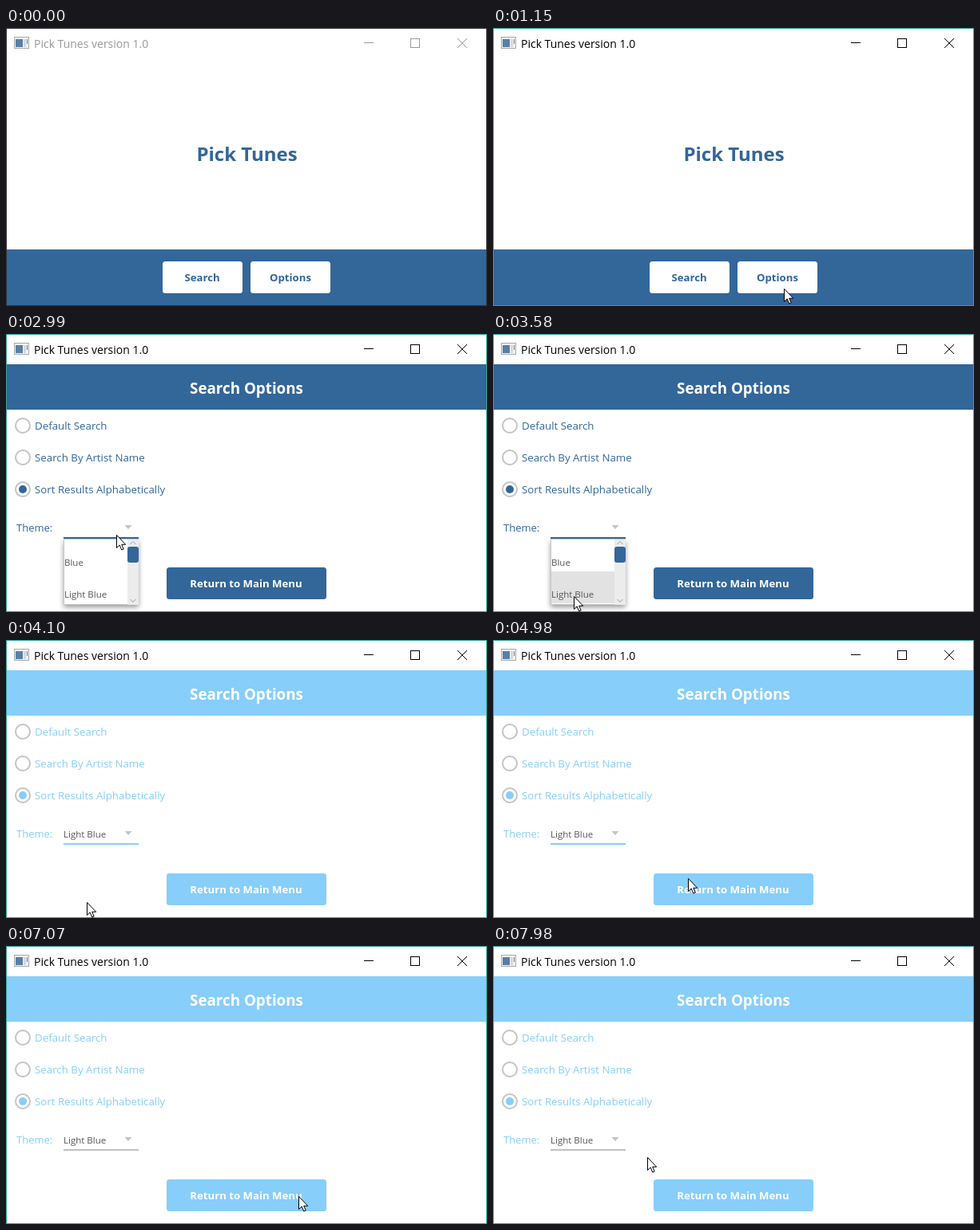
Write an HTML page that moves like this. It is 602 by 349 pixels and loops after 8 s.

```html
<!DOCTYPE html>
<html lang="en">
<head>
<meta charset="utf-8">
<title>Pick Tunes</title>
<style>
  html, body { margin: 0; width: 100%; height: 100%; overflow: hidden; background: #fff; }
  svg { display: block; width: 602px; height: 349px; font-family: "Open Sans", "Noto Sans", sans-serif;
        --accent: #336699; --chrome: #999; --frame: #333; --line: #c0c0c0; --arrow: #c4c4c4; }
  .active { --chrome: #000; --frame: #2ba898; }
  .light { --accent: #87cefa; }
  .focused { --line: var(--accent); }
  .hovered { --arrow: #909090; }
  .accent { fill: var(--accent); }
  .white { fill: #fff; }
  .bold { font-weight: 700; text-anchor: middle; }
  .button { font-size: 13.2px; }
  .label { font-size: 13.3px; }
  .item { font-size: 11.5px; fill: #555; }
  .control { fill: none; stroke: var(--chrome); }
</style>
</head>
<body>
<svg id="stage" viewBox="0 0 602 349">
  <defs>
    <filter id="shadow" x="-20%" y="-20%" width="140%" height="140%">
      <feDropShadow dx="0" dy="3" stdDeviation="3" flood-opacity=".4"/>
    </filter>
  </defs>
  <rect width="602" height="349" class="white"/>

  <!-- title bar -->
  <g shape-rendering="crispEdges">
    <rect x="10.5" y="11.5" width="18" height="14" fill="#f4f4f4" stroke="#a3a9ae"/>
    <rect x="12" y="14" width="9" height="10" fill="#5a7fa6"/>
    <rect x="22" y="14" width="3" height="10" fill="#d4d9dd"/>
    <rect x="26" y="14" width="1" height="6" fill="#707880"/>
  </g>
  <text x="35" y="24.5" font-size="14" fill="var(--chrome)">Pick Tunes version 1.0</text>
  <path class="control" d="M448 18.5h12M506.500 13.500h11v11h-11z" shape-rendering="crispEdges"/>
  <path class="control" d="M565 13l12 12M577 13l-12 12"/>

  <g id="menu">
    <text x="301.500" y="167" font-size="24" class="accent bold">Pick Tunes</text>
    <rect y="278" width="602" height="71" class="accent"/>
    <rect x="196" y="293" width="100" height="40" rx="3.500" class="white"/>
    <rect x="306" y="293" width="100" height="40" rx="3.500" class="white"/>
    <text x="245.500" y="318" class="accent bold button">Search</text>
    <text x="356" y="318" class="accent bold button">Options</text>
  </g>

  <g id="options">
    <rect y="38" width="602" height="57" class="accent"/>
    <text x="301" y="75" font-size="18.800" class="white bold">Search Options</text>
    <g id="radios"></g>
    <circle cx="21" cy="195" r="5" class="accent"/>
    <text x="13" y="248" font-size="13" class="accent">Theme:</text>
    <text id="theme" x="72" y="248" class="item">Light Blue</text>
    <path d="M148.500 240h9l-4.500 5z" fill="var(--arrow)"/>
    <rect x="72" y="255" width="94" height="2" fill="var(--line)"/>
    <rect x="201" y="293" width="200" height="40" rx="3.500" class="accent"/>
    <text x="300.500" y="318" class="white bold button">Return to Main Menu</text>
  </g>

  <g id="popup">
    <rect x="72" y="258" width="94" height="82" class="white" filter="url(#shadow)"/>
    <rect x="72.500" y="257.500" width="93" height="82" fill="#fff" stroke="#c8c8c8"/>
    <rect id="hover" x="73" width="79" height="40" fill="#e2e2e2"/>
    <text x="73" y="291" class="item">Blue</text>
    <text x="73" y="331" class="item">Light Blue</text>
    <rect x="152" y="258" width="14" height="82" fill="#ececec"/>
    <rect x="152" y="267" width="14" height="20" rx="3" class="accent"/>
    <path d="M155.500 264l3.500-3.500 3.500 3.500M155.500 333l3.500 3.500 3.500-3.500" fill="none" stroke="#999"/>
    <rect x="72" y="255" width="94" height="2" class="accent"/>
  </g>

  <rect x=".5" y=".5" width="601" height="348" fill="none" stroke="var(--frame)" shape-rendering="crispEdges"/>
  <path id="cursor" d="M.5 .5v16l3.700-3.500 2.500 6 2.500-1-2.500-5.700h5z" fill="#fff" stroke="#000"/>
</svg>
<script>
const LOOP = 8000;
const byId = id => document.getElementById(id);
const stage = byId('stage');

// Pointer route: time, x, y
const route = [
  [0, 371, 360], [470, 371, 360], [850, 364, 327],
  [1630, 364, 327], [1950, 153, 250], [2060, 134, 241], [2170, 140, 247],
  [2890, 140, 247], [3580, 101, 329],
  [4460, 101, 329], [4700, 176, 285], [4830, 222, 276], [4980, 244, 299], [5290, 242, 317],
  [6270, 242, 317], [6440, 306, 302], [6630, 366, 314],
  [7620, 366, 314], [7980, 193, 265], [LOOP, 193, 265]
];

byId('radios').innerHTML = ['Default Search', 'Search By Artist Name', 'Sort Results Alphabetically']
  .map((name, i) => {
    const y = 115 + 40 * i;
    return `<circle cx="21" cy="${y}" r="9" fill="none" stroke="#c4c4c4" stroke-width="2"/>
      <text x="36" y="${y + 5}" class="accent label">${name}</text>`;
  }).join('');

const between = (t, from, to) => t >= from && t < to;
const show = (id, visible) => { byId(id).style.display = visible ? '' : 'none'; };

// The pointer comes to rest at turning points and before pauses.
function slope(i, axis) {
  const prev = route[i - 1], here = route[i], next = route[i + 1];
  if (!prev || !next) return 0;
  const before = here[axis] - prev[axis], after = next[axis] - here[axis];
  return before * after <= 0 ? 0 : (before + after) / (next[0] - prev[0]);
}

function pointerAt(t) {
  const i = Math.max(0, route.findIndex(p => p[0] > t) - 1);
  const a = route[i], b = route[i + 1], span = b[0] - a[0], u = (t - a[0]) / span;
  return [1, 2].map(axis => Math.round(
    a[axis] + (b[axis] - a[axis]) * u * u * (3 - 2 * u)
    + span * u * (1 - u) * (slope(i, axis) * (1 - u) - slope(i + 1, axis) * u)));
}

function draw(t) {
  const [x, y] = pointerAt(t);
  const menu = t < 1310 || between(t, 5770, 7070);
  stage.classList.toggle('active', t >= 1150);
  stage.classList.toggle('light', t >= 4010);
  stage.classList.toggle('focused', between(t, 2500, 5670));
  stage.classList.toggle('hovered', between(t, 1900, 2170));
  show('menu', menu);
  show('options', !menu);
  show('theme', t >= 4010);
  show('popup', between(t, 2500, 4100));
  show('hover', y >= 258);
  byId('hover').setAttribute('y', y < 298 ? 258 : 298);
  byId('cursor').setAttribute('transform', `translate(${x} ${y})`);
}

const start = performance.now();
function tick() {
  draw((performance.now() - start) % LOOP);
  requestAnimationFrame(tick);
}
tick();
</script>
</body>
</html>
```
